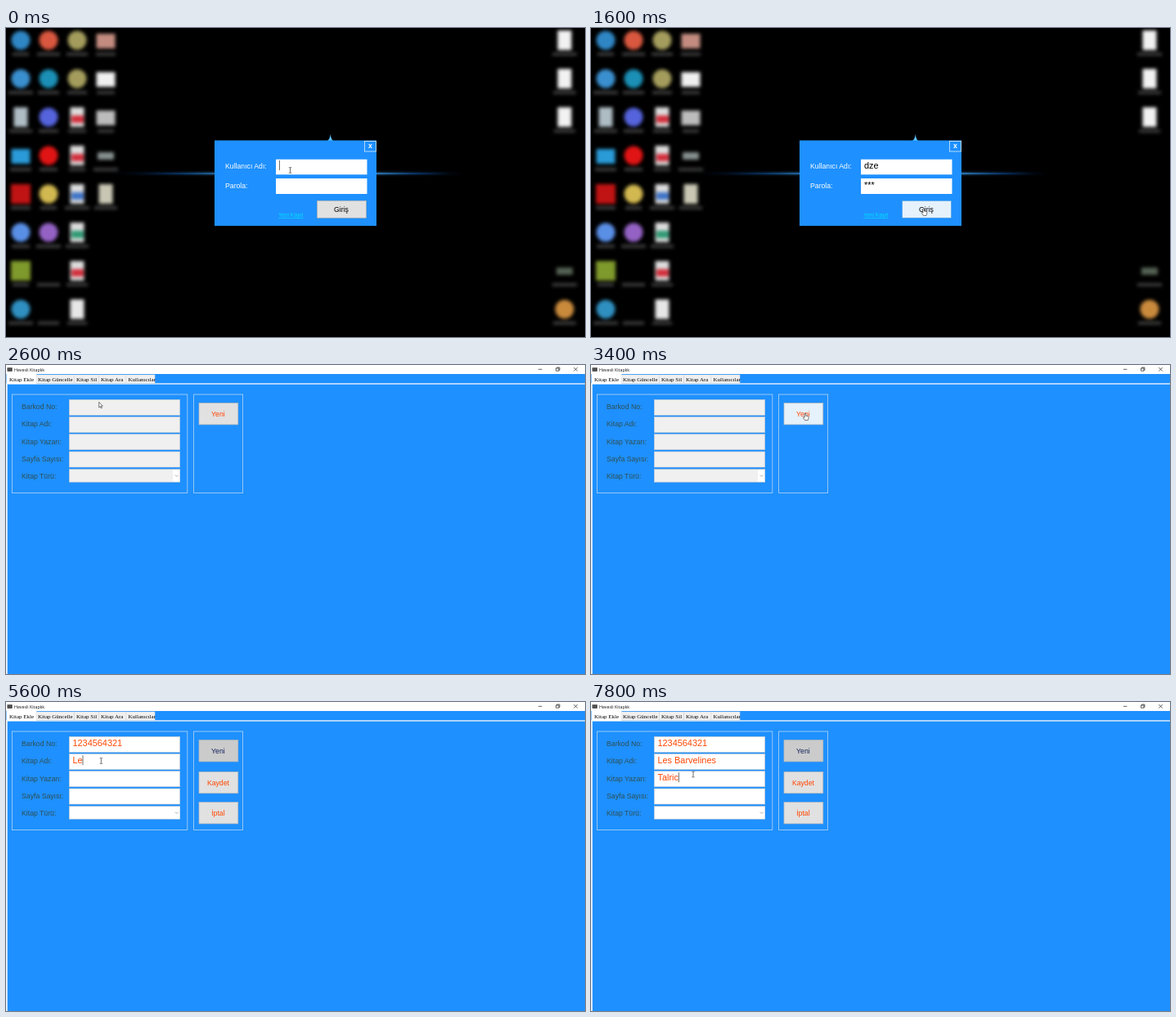
An HTML page for the animation above (8000 ms loop, 708 px wide and 378 px high).

```html
<!DOCTYPE html>
<html lang="tr">
<head>
<meta charset="utf-8">
<title>Hevesli Kitaplık</title>
<style>
html, body { margin: 0; width: 100%; height: 100%; overflow: hidden; background: #000; }
svg { display: block; width: 708px; height: 378px; }
text { font-family: "Liberation Sans", Arial, sans-serif; font-size: 8.7px; white-space: pre; }
.typed { font-size: 10.9px; }
.tab { font-family: "Liberation Serif", "Times New Roman", serif; font-size: 7px; }
.title { font-family: "Open Sans", "Noto Sans", sans-serif; font-size: 5.3px; }
.mid { text-anchor: middle; }
.blur { filter: blur(2px); }
</style>
</head>
<body>
<svg id="stage" viewBox="0 0 708 378" xmlns="http://www.w3.org/2000/svg"></svg>
<script>
const LOOP = 8000, STEP = 100;
const BLUE = '#1e90ff', ORANGE = '#ff4500';

const rect = (x, y, w, h, fill, extra = '') =>
  `<rect x="${x}" y="${y}" width="${w}" height="${h}" fill="${fill}" ${extra}/>`;
const text = (x, y, str, fill, extra = '') =>
  `<text x="${x}" y="${y}" fill="${fill}" ${extra}>${str}</text>`;
const path = (d, stroke, width = 0.7, fill = 'none') =>
  `<path d="${d}" stroke="${stroke}" stroke-width="${width}" fill="${fill}"/>`;
const group = (id, body, extra = '') => `<g id="${id}" ${extra}>${body}</g>`;

// Desktop icons: column x and one "shape colour" entry per row.
// o circle, d sheet, s square, w wide box, m sheet with a coloured mark, - label only, . nothing
const COLUMNS = [
  [18, 'o#2f86c4 o#3a8fce d#aebcc4 w#2a9bd8 s#c01313 o#5a8fe6 s#7f9a2c o#2f8fc0'],
  [52, 'o#d9573f o#1b8fb5 o#5563dc o#e01414 o#d2b850 o#9462c4 -#000 -#000'],
  [87, 'o#a39c5c o#a39c5c m#d32f3c m#d32f3c m#3f74c8 m#2f9a74 m#d32f3c d#e6e6e6'],
  [122, 'w#c48c80 w#f0f0f0 w#bcbcbc k#87908f d#c9c7b4'],
  [683, 'd#f2f2f2 d#f2f2f2 d#f2f2f2 . . . k#536052 o#c98a3c']
];
const SHAPES = {
  o: (x, y, c) => `<circle cx="${x}" cy="${y}" r="11.5" fill="${c}"/>`,
  s: (x, y, c) => rect(x - 12, y - 12, 24, 24, c),
  w: (x, y, c) => rect(x - 11.5, y - 8, 23, 18, c),
  k: (x, y, c) => rect(x - 10, y - 4, 20, 9, c),
  d: (x, y, c) => rect(x - 8.5, y - 12, 17, 24, c),
  m: (x, y, c) => rect(x - 8.5, y - 12, 17, 24, '#dcdcdc') + rect(x - 7, y - 2, 15, 9, c),
  '-': () => ''
};
const icons = COLUMNS.map(([x, list]) => list.split(' ').map((item, row) => {
  if (item === '.') return '';
  const y = 15 + row * 47;
  const half = 10 + (row * 5 + x) % 6;
  return SHAPES[item[0]](x, y, item.slice(1)) + rect(x - half, y + 15, half * 2, 4, '#3c3c3c');
}).join('')).join('');

const login =
  rect(0, 0, 708, 378, '#000') +
  group('icons', icons, 'class="blur"') +
  rect(130, 176, 430, 4, 'url(#glow)', 'opacity=".4" style="filter:blur(1.3px)"') +
  rect(165, 177.4, 375, 1.3, 'url(#glow)') +
  `<path d="M393 138Q396 136 396.7 130Q397.5 136 400 138Z" fill="#5cc4ff" style="filter:blur(.5px)"/>` +
  rect(255, 137.5, 198, 104.5, BLUE) +
  rect(438.5, 138.5, 14, 12.5, 'none', 'stroke="#d6eaff" stroke-width=".8"') +
  text(445.4, 147.4, 'x', '#fff', 'class="mid" font-weight="bold"') +
  text(268, 172, 'Kullanıcı Adı:', '#fff') +
  text(268, 196, 'Parola:', '#fff') +
  rect(330, 160.7, 111.5, 18.6, '#fff') +
  rect(330, 184, 111.5, 19, '#fff') +
  rect(380.5, 211.3, 60, 21, '#e1e1e1', 'id="enter" stroke="#adadad" stroke-width=".7"') +
  text(410, 225, 'Giriş', '#000', 'class="mid"') +
  text(333, 231, 'Yeni Kayıt', '#00e1ff', 'style="font-size:6.8px" text-decoration="underline"');

const titleBar =
  rect(0, 0, 708, 11, '#fff') +
  rect(1.6, 3.2, 6, 4.6, '#333') + path('M3.4 3.2V7M5.4 3.2V7', '#aaa', 0.5) +
  text(10, 7.5, 'Hevesli Kitaplık', '#111', 'class="title"') +
  path('M651 5.3H655.5M673.5 4V3H677V6.3H676M672.6 4H676V7.2H672.6ZM694.3 3L698.8 7.5M698.8 3L694.3 7.5', '#222', 0.7);

const TABS = [['Kitap Ekle', 0, 4], ['Kitap Güncelle', 37, 39], ['Kitap Sil', 83.5, 86],
  ['Kitap Ara', 113.5, 116], ['Kullanıcılar', 147, 149.5]];
const tabs = TABS.map(([name, x, tx], i) => {
  const right = i < 4 ? TABS[i + 1][1] : 182;
  const box = i ? rect(x, 12, right - x, 10.3, '#f0f0f0', 'stroke="#d9d9d9" stroke-width=".5"')
                : rect(x + 0.5, 11, right - x, 12, '#fff');
  return box + text(tx, 19.6, name, '#000', 'class="tab"');
}).join('');

const LABELS = [['Barkod No:', 54.3], ['Kitap Adı:', 75.4], ['Kitap Yazarı:', 96.6],
  ['Sayfa Sayısı:', 118], ['Kitap Türü:', 138.7]];
const frame = (x, w) => rect(x, 36, w, 120.5, 'none', 'stroke="#b4d4f2" stroke-width=".8"');
const field = (y, h) => rect(77.3, y, 135.4, h, '#f0f0f0', 'class="field" stroke="#c4c9ce" stroke-width=".6"');
const button = (y, label, id) => group(id,
  rect(236, y, 47.8, 26.3, '#e1e1e1', 'stroke="#b5b5b5" stroke-width=".7"') +
  text(259.4, y + 16.4, label, ORANGE, 'class="mid"'));

const form =
  rect(0, 22.3, 708, 1.4, '#e9f3fd') + rect(0, 23, 1.8, 355, '#e9f3fd') + tabs +
  frame(7.5, 214.3) + frame(229.6, 60) +
  LABELS.map(([label, y]) => text(19, y, label, '#2f4f4f')).join('') +
  [63.6, 84.7, 106].map(y => field(y, 19)).join('') + field(127.6, 15.6) +
  rect(204, 128.2, 8.3, 14.4, '#fff') +
  path('M206.8 134.6L208.6 136.4L210.4 134.6', '#8a8a8a', 0.7) +
  button(46.6, 'Yeni', 'add') +
  group('extra', button(85.4, 'Kaydet', 'save') + button(122.6, 'İptal', 'cancel'));

const cursors =
  group('beam', path('M-1.6 -3.4H-.4L0 -3L.4 -3.4H1.6M0 -3V3M-1.6 3.4H-.4L0 3L.4 3.4H1.6', '#333', 0.7)) +
  group('arrow', path('M0 0V6.6L1.5 5.2L2.6 7.6L3.6 7.1L2.6 4.8H4.6Z', '#222', 0.6, '#fff')) +
  group('hand', path('M-.8 .4Q0 -.5 .8 .4V3.2Q3.8 3.2 4 4.6V6.4L3.2 8.6H-.4L-2.6 5.4Q-2.4 4.2 -.8 5.2Z', '#222', 0.6, '#fff'));

const stage = document.getElementById('stage');
stage.innerHTML =
  `<defs><linearGradient id="glow">
    <stop offset="0" stop-color="#0a3a80" stop-opacity="0"/>
    <stop offset=".14" stop-color="#0c4a94" stop-opacity=".7"/>
    <stop offset=".3" stop-color="#3fa0ee"/><stop offset=".75" stop-color="#3fa0ee"/>
    <stop offset=".9" stop-color="#0c4a94" stop-opacity=".7"/>
    <stop offset="1" stop-color="#0a3a80" stop-opacity="0"/>
  </linearGradient></defs>` +
  group('login', login) +
  group('main', rect(0, 0, 708, 378, BLUE) + titleBar + field(42.4, 19) + group('form', form)) +
  group('inputs', '') +
  rect(0, 0, 0.7, 12, '#333', 'id="caret"') +
  group('cursor', cursors);
const $ = id => document.getElementById(id);

// Typed entries: place, text, colour, time the text vanishes, [time, letters shown].
const ENTRIES = [
  { x: 334, y: 171.8, str: 'dze', fill: '#000', until: 1700, keys: [[0, 0], [100, 2], [200, 3]] },
  { x: 334, y: 196, str: '***', fill: '#000', until: 1700, keys: [[400, 0], [500, 1], [700, 2], [800, 3]] },
  { x: 81.5, y: 53.8, str: '1234564321', fill: ORANGE, until: LOOP,
    keys: [[4600, 0], [4800, 2], [4900, 4], [5000, 6], [5100, 8], [5200, 9], [5300, 10]] },
  { x: 81.5, y: 74.9, str: 'Les Barvelines', fill: ORANGE, until: LOOP,
    keys: [[5400, 0], [5500, 1], [5600, 2], [5700, 3], [5800, 4], [6000, 5], [6200, 6],
      [6300, 8], [6400, 9], [6500, 11], [6600, 13], [6700, 14]] },
  { x: 81.5, y: 96, str: 'Talric', fill: ORANGE, until: LOOP,
    keys: [[7100, 0], [7300, 1], [7400, 2], [7500, 3], [7700, 5], [7800, 6]] }
];
$('inputs').innerHTML = ENTRIES.map(e => text(e.x, e.y, '', e.fill, 'class="typed"')).join('');
const nodes = [...$('inputs').children];

// Pointer path: time, x, y.
const PATH = [[0, 347.5, 174], [900, 347.5, 174], [1200, 406.8, 220.8], [1900, 406.8, 220.8],
  [2600, 113.7, 45.4], [2800, 97, 43], [2900, 97, 43], [3400, 262, 59], [3700, 262, 59],
  [4600, 105.5, 53], [5200, 105.5, 53], [5400, 116.3, 72], [6800, 116.3, 72], [7100, 125, 88.5], [LOOP, 125, 88.5]];
const SHAPE_AT = [[0, 'beam'], [1000, 'arrow'], [1200, 'hand'], [2000, 'arrow'],
  [3300, 'hand'], [3900, 'arrow'], [4200, 'beam']];

const last = (keys, t) => keys.filter(k => k[0] <= t).pop();
const show = (id, on) => $(id).setAttribute('visibility', on ? 'inherit' : 'hidden');

function pointer(t) {
  const i = Math.max(1, PATH.findIndex(k => k[0] > t));
  const [t0, x0, y0] = PATH[i - 1], [t1, x1, y1] = PATH[i];
  const u = (t - t0) / (t1 - t0), k = u * u * (3 - 2 * u);
  return [x0 + (x1 - x0) * k, y0 + (y1 - y0) * k];
}

function render(t) {
  const opened = t >= 1700, enabled = t >= 3600, hover = t >= 1200;
  show('login', !opened);
  show('main', opened);
  show('form', t >= 1800);
  show('extra', enabled);
  $('enter').setAttribute('fill', hover ? '#e5f1fb' : '#e1e1e1');
  $('enter').setAttribute('stroke', hover ? '#4b9fe3' : '#adadad');
  document.querySelectorAll('.field').forEach(f => f.setAttribute('fill', enabled ? '#fff' : '#f0f0f0'));
  const [face, label] = $('add').children;
  face.setAttribute('fill', enabled ? '#cbcbcb' : t >= 3300 ? '#e5f1fb' : '#e1e1e1');
  label.setAttribute('fill', enabled ? '#12225a' : ORANGE);

  let focus = -1;
  ENTRIES.forEach((e, i) => {
    const key = t < e.until && last(e.keys, t);
    nodes[i].textContent = key ? e.str.slice(0, key[1]) : '';
    if (key) focus = i;
  });
  const blinkOff = t >= 900 && t < 1700;
  show('caret', focus >= 0 && !blinkOff);
  if (focus >= 0) {
    const e = ENTRIES[focus];
    const x = e.x + nodes[focus].getComputedTextLength();
    $('caret').setAttribute('transform', `translate(${x} ${e.y - 9.8})`);
  }

  const [x, y] = pointer(t), shape = last(SHAPE_AT, t)[1];
  $('cursor').setAttribute('transform', `translate(${x.toFixed(1)} ${y.toFixed(1)})`);
  ['beam', 'arrow', 'hand'].forEach(id => show(id, id === shape));
}

const start = performance.now();
function tick() {
  const t = (performance.now() - start) % LOOP;
  render(Math.floor(t / STEP) * STEP);
  requestAnimationFrame(tick);
}
tick();
</script>
</body>
</html>
```
